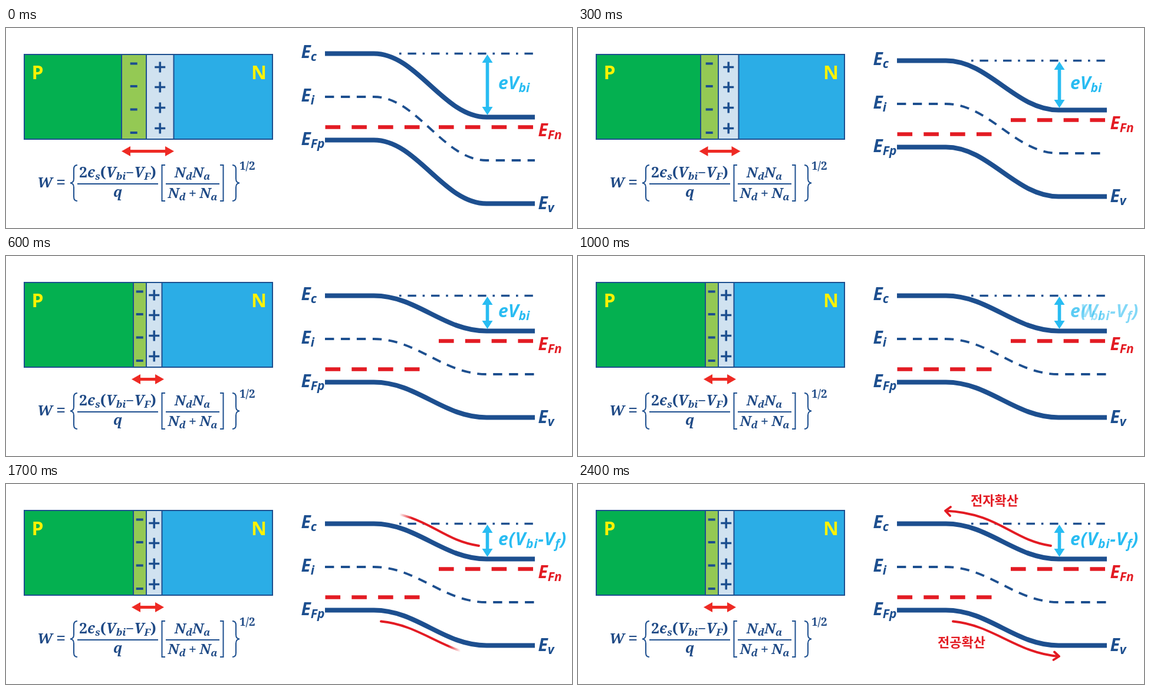
Write an HTML page that moves like this. It is 960 px wide and 340 px high and loops after 2.5 s.

```html
<!DOCTYPE html>
<html lang="en">
<head>
<meta charset="utf-8">
<title>PN junction under forward bias</title>
<style>
  html, body { margin: 0; width: 100%; height: 100%; overflow: hidden; background: #fff; }
  svg { display: block; width: 960px; height: 340px; }
  .navy { stroke: #1d4f8f; fill: none; }
  .red { stroke: #e31b23; fill: none; }
  .band { stroke-width: 8; }
  .thin { stroke-width: 3.85; stroke-dasharray: 15.4 11.55; }
  .dotted { stroke-width: 3.6; stroke-dasharray: 3.6 10.8 14.4 10.8; }
  .fermi { stroke-width: 6.4; stroke-dasharray: 25.6 19.2; }
  .label { font: italic 700 30px "Noto Sans", "Open Sans", sans-serif; fill: #1d4f8f; }
  .label .sub { font-size: 21px; }
  .region { font: 600 32px "Noto Sans", "Open Sans", sans-serif; fill: #fff200; }
  .math { font: italic 700 24px "Noto Serif", "Liberation Serif", serif; fill: #1f4a86; }
  .math .sub { font-size: 17px; }
  .up { font-style: normal; }
  .korean { font: 700 22px "Noto Sans CJK KR", "Noto Sans CJK", sans-serif; fill: #e31b23; }
  .label .cyan, .cyan { fill: #28bcf2; }
</style>
</head>
<body>
<svg viewBox="0 0 960 340" xmlns="http://www.w3.org/2000/svg">
  <defs>
    <linearGradient id="fadeUpper" gradientUnits="userSpaceOnUse" y1="0" y2="0">
      <stop offset="0" stop-color="#000"/><stop offset="1" stop-color="#fff"/>
    </linearGradient>
    <linearGradient id="fadeLower" gradientUnits="userSpaceOnUse" y1="0" y2="0">
      <stop offset="0" stop-color="#000"/><stop offset="1" stop-color="#fff"/>
    </linearGradient>
    <mask id="wipeUpper" maskUnits="userSpaceOnUse" x="0" y="0" width="960" height="340">
      <rect width="960" height="340" fill="url(#fadeUpper)"/>
    </mask>
    <mask id="wipeLower" maskUnits="userSpaceOnUse" x="0" y="0" width="960" height="340">
      <rect width="960" height="340" fill="url(#fadeLower)"/>
    </mask>
  </defs>

  <!-- junction -->
  <rect x="31" y="45" width="207" height="144" fill="#04b050"/>
  <rect x="238" y="45" width="214" height="144" fill="#2bade6"/>
  <rect id="pDepletion" y="45" height="144" fill="#94c954"/>
  <rect id="nDepletion" x="238" y="45" height="144" fill="#d0e2f0"/>
  <path id="walls" class="navy" stroke-width="2"/>
  <rect class="navy" x="31" y="45" width="421" height="144" stroke-width="2"/>
  <path id="minuses" class="navy" stroke-width="4"/>
  <path id="pluses" class="navy" stroke-width="3.6"/>
  <text class="region" x="43.500" y="86.500">P</text>
  <text class="region" x="416" y="86.500">N</text>
  <path id="widthArrow" fill="#ee2a24"/>

  <!-- depletion width formula -->
  <g class="math">
    <text x="53" y="271">W</text>
    <text class="up" x="93" y="273" text-anchor="middle" style="font-size:29px">=</text>
    <text x="189.5" y="254" text-anchor="middle" style="font-size:24.5px"><tspan class="up">2</tspan>ϵ<tspan class="sub" dy="4">s</tspan><tspan class="up" dy="-4">(</tspan>V<tspan class="sub" dy="4">bi</tspan><tspan class="up" dy="-4">−</tspan>V<tspan class="sub" dy="4">F</tspan><tspan class="up" dy="-4">)</tspan></text>
    <text x="189.5" y="287" text-anchor="middle">q</text>
    <text x="316" y="254" text-anchor="middle">N<tspan class="sub" dy="4">d</tspan><tspan dy="-4">N</tspan><tspan class="sub" dy="4">a</tspan></text>
    <text x="316.5" y="288.500" text-anchor="middle">N<tspan class="sub" dy="4">d</tspan><tspan class="up" dy="-4" dx="5">+</tspan><tspan dx="5">N</tspan><tspan class="sub" dy="4">a</tspan></text>
    <text class="up" x="396" y="241" style="font-size:19px">1/2</text>
  </g>
  <g class="navy" stroke-width="2">
    <path d="M121 265H258M271 265H362"/>
    <path d="M270 233H264.500V294H270M363 233H368.500V294H363"/>
    <path d="M121 233Q115 233 115 240V256Q115 263 109 263.500Q115 264 115 271V287Q115 294 121 294"/>
    <path d="M384 233Q390 233 390 240V256Q390 263 396 263.500Q390 264 390 271V287Q390 294 384 294"/>
  </g>

  <!-- band diagram -->
  <path id="barrierTop" class="navy dotted"/>
  <path id="pFermi" class="red fermi"/>
  <path id="nFermi" class="red fermi"/>
  <path id="intrinsic" class="navy thin"/>
  <path id="conduction" class="navy band"/>
  <path id="valence" class="navy band"/>
  <path id="barrierArrow" class="cyan"/>

  <g id="pLabels" class="label">
    <text x="500.500" y="50.500">E<tspan class="sub" dy="5">c</tspan></text>
    <text x="500.500" y="124.500">E<tspan class="sub" dy="5">i</tspan></text>
    <text x="500.500" y="198.500">E<tspan class="sub" dy="5">Fp</tspan></text>
  </g>
  <g id="nLabels" class="label">
    <text x="902.500" y="184" style="fill:#e31b23">E<tspan class="sub" dy="5">Fn</tspan></text>
    <text x="902.500" y="308">E<tspan class="sub" dy="5">v</tspan></text>
  </g>
  <g class="label">
    <text id="builtIn" class="cyan" x="835" y="103.500">eV<tspan class="sub" dy="5">bi</tspan></text>
    <text id="lowered" class="cyan" x="835" y="103.500" letter-spacing=".8">e(V<tspan class="sub" dy="5">bi</tspan><tspan dy="-5">-V</tspan><tspan class="sub" dy="5">f</tspan><tspan dy="-5">)</tspan></text>
  </g>

  <!-- diffusion -->
  <g class="red" stroke-width="3.8" stroke-linecap="round" stroke-linejoin="round">
    <g mask="url(#wipeUpper)"><path d="M802 105C735 95 715 50 623 45.500M632 39L623 45.500L631 54"/></g>
    <g mask="url(#wipeLower)"><path d="M636 233.500C705 240 745 288 816 293M808 285.500L816 293L806.500 299"/></g>
  </g>
  <g id="diffusion" class="korean">
    <text x="666" y="35.500">전자확산</text>
    <text x="610" y="277">전공확산</text>
  </g>
</svg>
<script>
const STEP = 100, STEPS = 25;
const $ = id => document.getElementById(id);
const set = (id, attrs) => {
  for (const name in attrs) $(id).setAttribute(name, attrs[name]);
};
const draw = (id, d) => set(id, { d });
const progress = (step, from, to) => Math.min(1, Math.max(0, (step - from) / (to - from)));

const bend = (left, right) =>
  `M541 ${left}H624C697 ${left} 742 ${right} 815 ${right}H897`;

// Double-headed arrow along one axis; at(u, v) places a point.
function doubleArrow(from, to, head, half, shaft, at) {
  const points = [
    [from, 0], [from + head, -half], [from + head, -shaft],
    [to - head, -shaft], [to - head, -half], [to, 0],
    [to - head, half], [to - head, shaft],
    [from + head, shaft], [from + head, half]
  ];
  return "M" + points.map(([u, v]) => at(u, v).join(" ")).join("L") + "Z";
}

const minusRows = [60.5, 99, 138.5, 178];
const plusRows = [66.5, 100.5, 135.5, 170.5];
const arrowHalfWidths = [44.5, 43, 40.5, 35, 30, 28, 27.5];

function drawJunction(step) {
  const shrink = 4 * Math.min(step, 5);
  const left = 196 + shrink, right = 284.5 - shrink;
  set("pDepletion", { x: left, width: 238 - left });
  set("nDepletion", { width: right - 238 });
  draw("walls", [left, 238, right].map(x => `M${x} 45V189`).join(""));

  const minusX = (left + 238) / 2 - 0.3, plusX = (right + 238) / 2;
  draw("minuses", minusRows.map(y => `M${minusX - 6} ${y}h12`).join(""));
  draw("pluses", plusRows.map(y => `M${plusX - 9} ${y}h18m-9 -9v18`).join(""));

  const half = arrowHalfWidths[Math.min(step, 6)];
  draw("widthArrow", doubleArrow(240.5 - half, 240.5 + half, 15, 8.5, 2.6,
    (u, v) => [u, 209.5 + v]));
}

function drawBands(step) {
  const shift = 4 * Math.min(step, 6);
  draw("conduction", bend(43.5 + shift, 151.5 - shift));
  draw("intrinsic", bend(117 + shift, 225 - shift));
  draw("valence", bend(190.5 + shift, 298.5 - shift));
  draw("barrierTop", `M667 ${43.5 + shift}H897`);
  draw("pFermi", `M541.5 ${168.5 + shift}H705`);
  draw("nFermi", `M734 ${168.5 - shift}H897`);
  draw("barrierArrow", doubleArrow(45 + shift, 148 - shift, 14, 9, 2.8,
    (u, v) => [816.5 + v, u]));
  set("pLabels", { transform: `translate(0 ${shift})` });
  set("nLabels", { transform: `translate(0 ${-shift})` });
}

function drawAnnotations(step) {
  const swap = progress(step, 6, 13);
  set("builtIn", { opacity: 1 - swap });
  set("lowered", { opacity: swap });

  const wipe = progress(step, 13, 19), soft = 21;
  const upper = 804 - wipe * (184 + soft), lower = 633 + wipe * (186 + soft);
  set("fadeUpper", { x1: upper, x2: upper + soft });
  set("fadeLower", { x1: lower, x2: lower - soft });

  set("diffusion", { opacity: progress(step, 18, 24) });
}

function render(time) {
  const step = Math.floor(time / STEP) % STEPS;
  drawJunction(step);
  drawBands(step);
  drawAnnotations(step);
}

const start = performance.now();
function tick() {
  render(performance.now() - start);
  requestAnimationFrame(tick);
}
tick();
</script>
</body>
</html>
```
